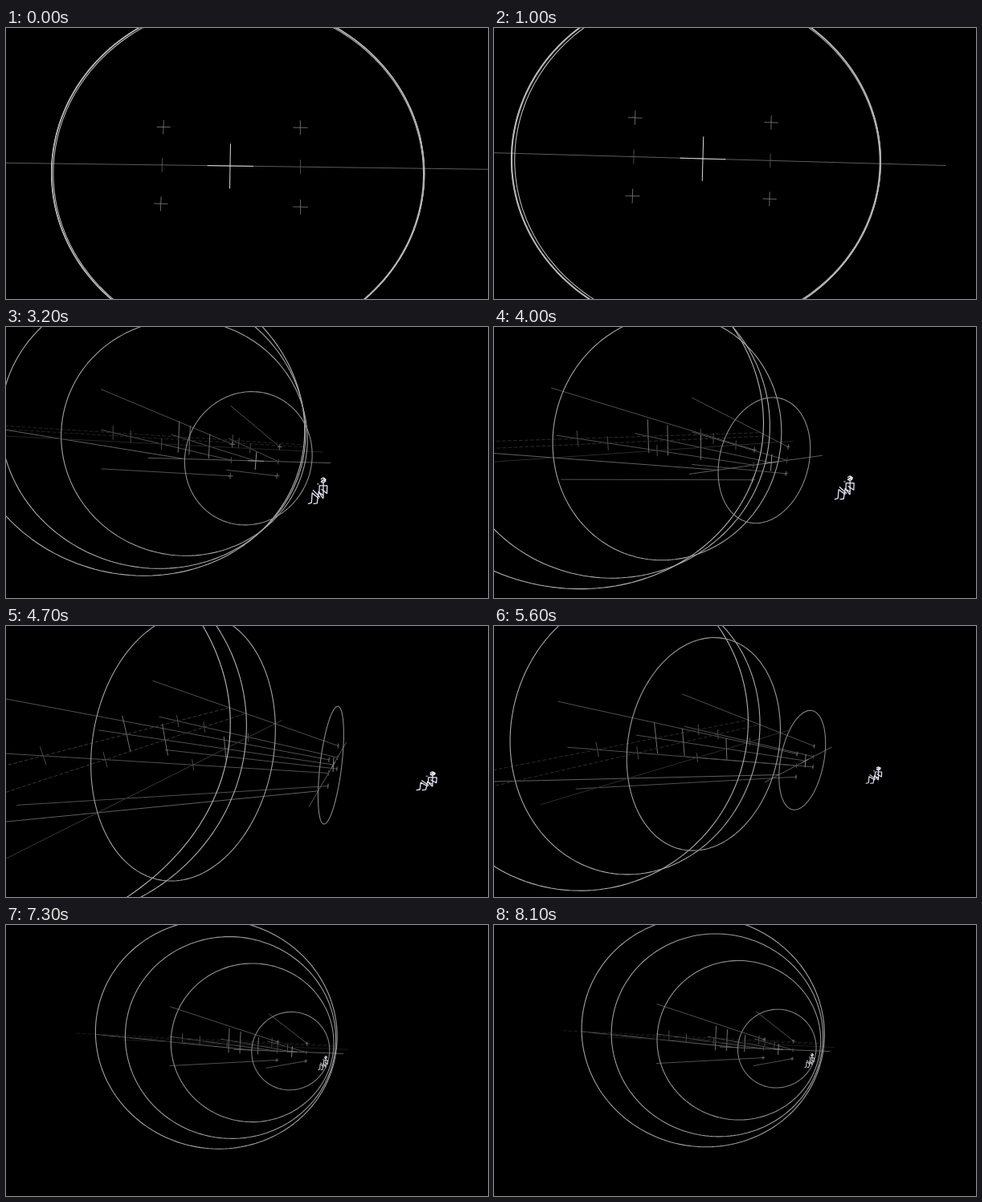
Recreate the animation shown at these times as an HTML page with a canvas. Size 600x338 px, loop 8.2 s.

```html
<!DOCTYPE html>
<html lang="en">
<head>
<meta charset="utf-8">
<title>Rings in perspective</title>
<style>
html, body { margin: 0; height: 100%; background: #000; overflow: hidden; }
canvas { display: block; width: 100vw; height: 100vh; }
</style>
</head>
<body>
<canvas id="stage" width="600" height="338"></canvas>
<script>
const ctx = document.getElementById('stage').getContext('2d');
const LOOP = 8200, STEP = 100;

// back: origin, x axis, y axis of the far plane; front: origin of the near plane
// lens: depth ratio, x and y foreshortening; man: head x, y, scale x, y, pen
const poses = [
  { t: 0,    back: [279, 172, 86, 1.15, -.8, 48.6],   front: [278.3, 171.3], lens: [1.008, -.017, -.0105], man: [510, 580, 3.4, 3.4, 3] },
  { t: 1000, back: [260, 163, 85, 2.4, -1.3, 48.2],   front: [258.6, 162.6], lens: [1.012, .0116, -.003],  man: [490, 540, 3.2, 3.2, 3] },
  { t: 2200, back: [251, 174, 60.8, -.5, -.3, 35.6],  front: [210, 150],     lens: [1.35, .0763, .013],    man: [383, 245, 1, 1, 2.6] },
  { t: 3200, back: [311, 167, 29.2, .8, -1.5, 18.9],  front: [215, 137],     lens: [2.2, .0985, .018],     man: [395, 191, .3, .3, 1.3] },
  { t: 4700, back: [407.5, 173, 5.6, -9.7, -.7, 15.3], front: [150, 135],    lens: [3.05, .24, .051],      man: [531, 184, .32, .21, 1.3] },
  { t: 6500, back: [358, 161, 18, .65, -.7, 11.1],    front: [279, 147],     lens: [2.9, .0397, .0113],    man: [400, 168, .15, .16, .9] },
  { t: 8100, back: [354, 155, 18.2, .75, -.7, 11.2],  front: [276, 141],     lens: [2.9, .0397, .0113],    man: [396, 162, .15, .16, .9] }
];
const eases = [
  u => u,
  u => u * u,
  u => 1 - (1 - u) ** 1.5,
  u => u ** 1.65,
  u => 3 * u * u - 2 * u ** 3 - .8 * u * (1 - u) ** 2,
  u => u
];
const DEPTHS = [0, .07, .23, 1];
const RX = 2.67, RY = 4.36, FRONT = -.04;

const figure = [
  [-9, -4, 0, -10, 10, -3, 8, 6, 0, 11, -9, 7, 5, -7, 6, 2, -8, 4],
  [0, 12, 0, 74],
  [-2, 62, -17, 52, -16, 23, 16, 23, 15, 55, -7, 38],
  [-20, 48, -2, 75],
  [-42, 42, -15, 70],
  [-62, 98, -49, 94, -46, 53, -20, 75],
  [-20, 52, -26, 96, -40, 98]
];

let pose;

function poseAt(t) {
  let i = 0;
  while (i < poses.length - 2 && t >= poses[i + 1].t) i++;
  const a = poses[i], b = poses[i + 1];
  const k = eases[i]((t - a.t) / (b.t - a.t));
  const mix = name => a[name].map((v, j) => v + (b[name][j] - v) * k);
  return { back: mix('back'), front: mix('front'), lens: mix('lens'), man: mix('man') };
}

// Plane coordinates u, v at depth s (0 near, 1 far) to the screen
function project(u, v, s) {
  const [w, q, p] = pose.lens, b = pose.back;
  const d = 1 - s + s * w + q * u + p * v;
  return [0, 1].map(i => (
    (1 - s) * pose.front[i] + s * w * b[i] +
    u * (w * b[2 + i] + q * b[i]) +
    v * (w * b[4 + i] + p * b[i])) / d);
}

const gray = v => `rgb(${v},${v},${v})`;

// Height of one plane unit on screen: nearer things are brighter
function unit(s) {
  return project(0, .5, s)[1] - project(0, -.5, s)[1];
}

function stroke(points, color, width = 1, dash = []) {
  ctx.beginPath();
  points.forEach(p => ctx.lineTo(...p));
  ctx.strokeStyle = color;
  ctx.lineWidth = width;
  ctx.setLineDash(dash);
  ctx.stroke();
}

function line(u1, v1, s1, u2, v2, s2, color, width, dash) {
  stroke([project(u1, v1, s1), project(u2, v2, s2)], color, width, dash);
}

function ring(s) {
  const points = [];
  for (let i = 0; i <= 180; i++) {
    const a = i * Math.PI / 90;
    points.push(project(RX * Math.cos(a), RY * Math.sin(a), s));
  }
  stroke(points, gray(112 + 1.5 * unit(s)), 1.1);
}

function plane(s) {
  const far = s === 1, faint = gray(22 + 140 * pose.lens[1]);
  ctx.globalAlpha = far ? 1 : Math.max(0, Math.min(1, (pose.lens[0] - 1) * 3));
  if (far) line(-3.8, 0, s, 3.7, 0, s, '#5c5c5c');
  else if (s > .2) line(-4, 0, s, 3.2, 0, s, faint);
  else line(-3, 0, s, 2.6, 0, s, faint, 1, [4, 3]);

  for (const u of [-1, 1]) line(u, -.18, s, u, .18, s, '#4c4c4c');
  const half = far ? .57 : .46;
  const tone = gray(far ? 100 + 2.4 * unit(s) : 112);
  line(0, -half, s, 0, half, s, tone);
  if (far) {
    line(-.33, 0, s, .33, 0, s, tone);
    for (const u of [-1, 1]) for (const v of [-1, 1]) {
      line(u - .1, v, s, u + .1, v, s, '#666');
      line(u, v - .18, s, u, v + .18, s, '#666');
    }
  }
  ctx.globalAlpha = 1;
}

function drawFigure() {
  const [x, y, sx, sy, pen] = pose.man;
  const at = (px, py) => [x + px * sx, y + py * sy];
  for (const path of figure) {
    const points = [];
    for (let i = 0; i < path.length; i += 2) points.push(at(path[i], path[i + 1]));
    stroke(points, '#e6e6f6', pen);
  }
  for (let i = 0; i < 3; i++) {
    const c = 4 * Math.cos(i * Math.PI / 3), d = 4 * Math.sin(i * Math.PI / 3);
    stroke([at(-22 - c, 16 - d), at(-22 + c, 16 + d)], '#999', Math.min(1, pen / 2));
  }
}

function draw(t) {
  pose = poseAt(t);
  ctx.fillStyle = '#000';
  ctx.fillRect(0, 0, 600, 338);
  ctx.lineCap = ctx.lineJoin = 'round';

  for (const u of [-1, 1]) for (const v of [-1, 0, 1]) line(u, v, 1, u, v, FRONT, '#505050');
  line(0, 0, 1, 0, 0, FRONT, '#505050');
  line(-RX, 0, 1, -RX, 0, 0, '#606060');
  DEPTHS.forEach(plane);
  DEPTHS.forEach(ring);
  drawFigure();
}

let start;
function loop(now) {
  start ??= now;
  draw(Math.floor((now - start) % LOOP / STEP) * STEP);
  requestAnimationFrame(loop);
}
requestAnimationFrame(loop);
</script>
</body>
</html>
```
